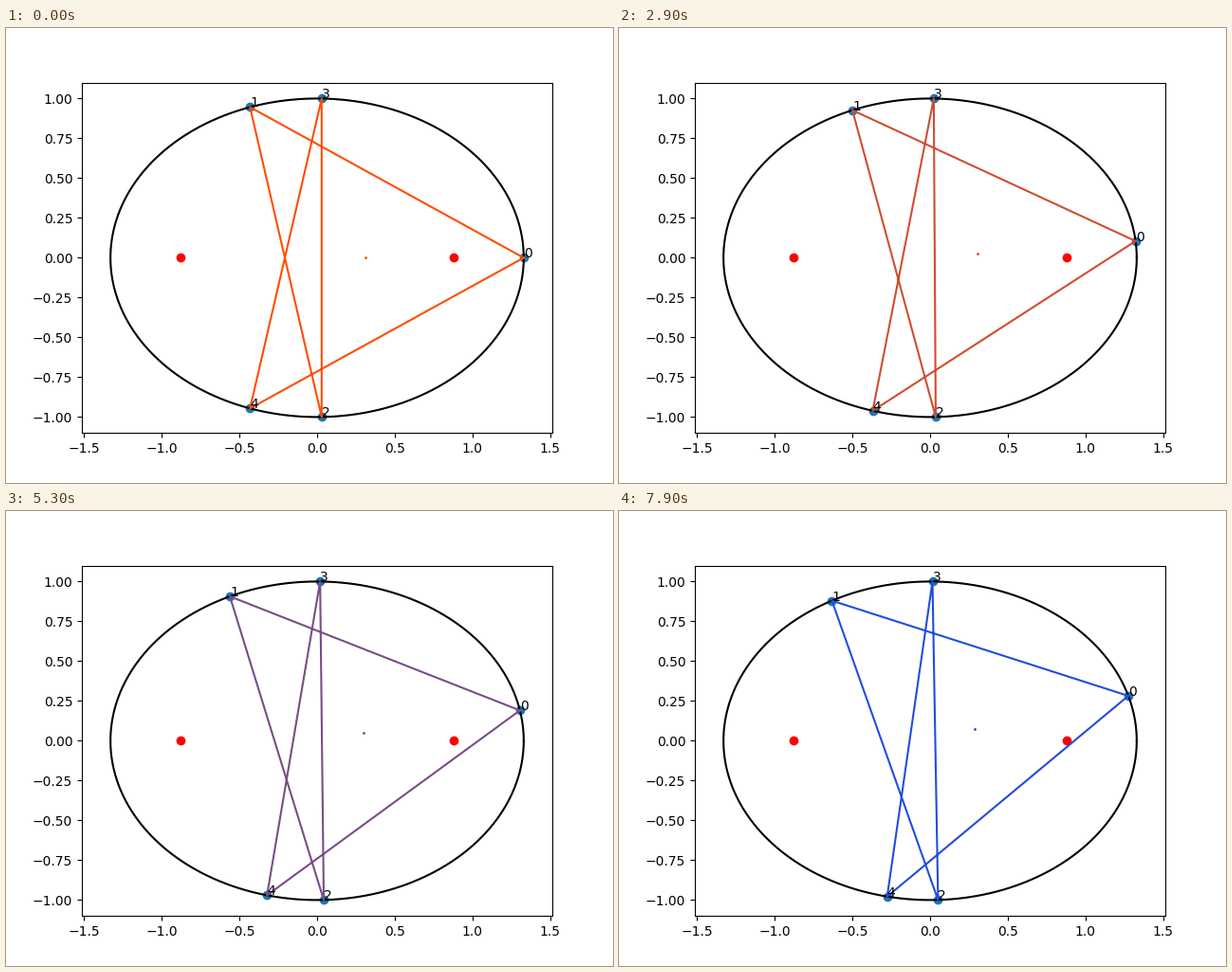
A matplotlib script that plays this animation: 640x480 px, repeating every 8000 ms.

```python
import numpy as np
import matplotlib.pyplot as plt
from matplotlib.animation import FuncAnimation

A, B = 1.33, 1.0
FRAMES, INTERVAL = 80, 100
STEP = 0.00362          # advance of vertex 0 per frame, eccentric angle
HUE_STEP = 0.0306       # phase of the colour wave per frame


def on_ellipse(t):
    return np.column_stack([A * np.cos(t), B * np.sin(t)])


def residual(u, t0):
    """Side lengths of the closed star minus the common length u[4]."""
    p = on_ellipse(np.r_[t0, u[:4]])
    sides = np.linalg.norm(np.roll(p, -1, axis=0) - p, axis=1)
    return sides - u[4]


def solve(u, t0):
    """Newton iteration for the equilateral star through angle t0."""
    h = 1e-6
    for _ in range(12):
        jac = np.column_stack([
            (residual(u + h * e, t0) - residual(u - h * e, t0)) / (2 * h)
            for e in np.eye(5)])
        u = u - np.linalg.solve(jac, residual(u, t0))
    return u


def star_path():
    u = np.array([1.901, -1.549, 1.549, -1.901, 2.0])
    stars = []
    for i in range(FRAMES):
        u = solve(u, STEP * i)
        stars.append(on_ellipse(np.r_[STEP * i, u[:4]]))
    return stars


stars = star_path()

fig, ax = plt.subplots(figsize=(6.4, 4.8), dpi=100)
ax.set_xlim(-1.514, 1.514)
ax.set_ylim(-1.1, 1.1)

ring = on_ellipse(np.linspace(0, 2 * np.pi, 400))
ax.plot(ring[:, 0], ring[:, 1], color="black")
focus = np.sqrt(A**2 - B**2)
ax.scatter([-focus, focus], [0, 0], color="red")

vertices = ax.scatter(*stars[0].T, color="C0")
star, = ax.plot([], [])
center, = ax.plot([], [], "o", markersize=1)
labels = [ax.text(0, 0, str(k)) for k in range(5)]


def update(i):
    p = stars[i]
    t = STEP * i
    mix = (1 - np.cos(HUE_STEP * i)) / 2
    color = (1 - mix, 0.3, mix)

    vertices.set_offsets(p)
    loop = np.vstack([p, p[:1]])
    star.set_data(loop[:, 0], loop[:, 1])
    star.set_color(color)
    center.set_data([0.311 - 0.27 * t**2], [0.268 * t])
    center.set_color(color)
    for label, xy in zip(labels, p):
        label.set_position(xy)
    return [vertices, star, center, *labels]


anim = FuncAnimation(fig, update, frames=FRAMES, interval=INTERVAL,
                     repeat=True, repeat_delay=0)
plt.show()
```
